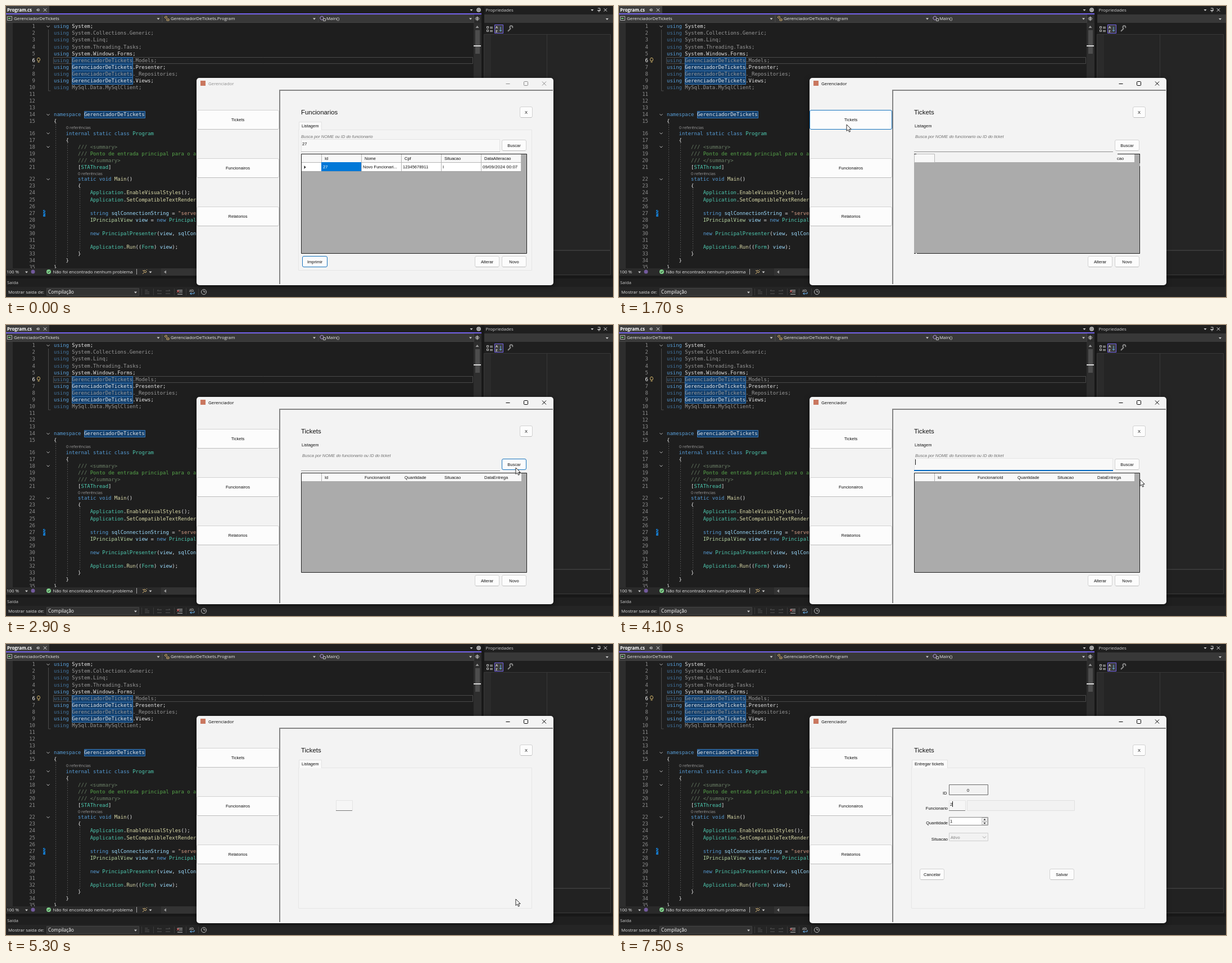
These frames come from a looping animation (1080x518 px, 8000 ms). An HTML page with a canvas:

```html
<!DOCTYPE html>
<html lang="pt">
<head>
<meta charset="utf-8">
<title>Gerenciador</title>
<style>
html, body { margin: 0; width: 100%; height: 100%; overflow: hidden; background: #1f1f1f; }
canvas { display: block; }
</style>
</head>
<body>
<canvas id="stage" width="1080" height="518"></canvas>
<script>
const g = document.getElementById('stage').getContext('2d');
const MONO = '8.96px "DejaVu Sans Mono", monospace', CHAR = 5.393;
const UI = '7.9px "Open Sans", sans-serif', UI_BOLD = 'bold ' + UI;
const FORM = '7.5px "Liberation Sans", Arial, sans-serif';
const BLUE = '#0067c0', FACE = '#f3f3f3';

// Drawing helpers
function rect(x, y, w, h, color) { g.fillStyle = color; g.fillRect(x, y, w, h); }
function box(x, y, w, h, stroke, fill, r = 0) {
  g.beginPath();
  g.roundRect(x + .5, y + .5, w - 1, h - 1, r);
  if (fill) { g.fillStyle = fill; g.fill(); }
  g.strokeStyle = stroke; g.lineWidth = 1; g.stroke();
}
function text(s, x, y, color, font = UI, align = 'left') {
  g.font = font; g.fillStyle = color; g.textAlign = align;
  g.fillText(s, x, y + parseFloat(font.replace(/^\D+/, '')) * .35);
}
function path(d, x, y, stroke, fill, width = 1) {
  const p = new Path2D(d);
  g.save(); g.translate(x, y);
  if (fill) { g.fillStyle = fill; g.fill(p); }
  if (stroke) { g.strokeStyle = stroke; g.lineWidth = width; g.stroke(p); }
  g.restore();
}
const drop = (x, y, c = '#d0d0d0') => path('M-2.5-1h5L0 2z', x, y, null, c);
const cross = (x, y, r, c) => path(`M${-r} ${-r}L${r} ${r}M${r} ${-r}L${-r} ${r}`, x, y, c);

// Code: "~" starts a run, its first letter is the colour
const INK = {
  k: '#569cd6', K: '#41719a', w: '#e4e4e4', D: '#989898', t: '#4ec9b0', i: '#b8d7a3',
  m: '#dcdcaa', s: '#d69d85', c: '#57a64a', d: '#6a7f66', v: '#9cdcfe'
};
const CODE = [
  '~kusing~w System;', '~Kusing~D System.Collections.Generic;', '~Kusing~D System.Linq;',
  '~Kusing~D System.Threading.Tasks;', '~kusing~w System.Windows.Forms;',
  '~Kusing~D GerenciadorDeTickets.Models;', '~kusing~w GerenciadorDeTickets.Presenter;',
  '~Kusing~D GerenciadorDeTickets._Repositories;', '~kusing~w GerenciadorDeTickets.Views;',
  '~Kusing~D MySql.Data.MySqlClient;', '', '', '',
  '~knamespace~w GerenciadorDeTickets', '~w{',
  '~k    internal static class ~tProgram', '~w    {',
  '~d        /// <summary>', '~d        ///~c Ponto de entrada principal para o aplicativo.',
  '~d        /// </summary>', '~w        [~tSTAThread~w]',
  '~k        static void ~mMain~w()', '~w        {',
  '~t            Application~w.~mEnableVisualStyles~w();',
  '~t            Application~w.~mSetCompatibleTextRenderingDefault~w(~kfalse~w);', '',
  '~k            string ~vsqlConnectionString~w = ~s"server=local"~w;',
  '~i            IPrincipalView ~vview~w = ~knew ~tPrincipalView~w();', '',
  '~k            new ~tPrincipalPresenter~w(~vview~w, ~vsqlConnectionString~w);', '',
  '~t            Application~w.~mRun~w((~tForm~w) ~vview~w);',
  '~w        }', '~w    }', '~w}'
];
const lineY = n => 36.2 + (n - 1) * 12.08 + (n > 15 ? 9 : 0) + (n > 21 ? 9.3 : 0);

function guide(x, y1, y2) {
  g.setLineDash([2, 2]);
  path(`M0 ${y1}V${y2}`, x + .5, 0, '#505050');
  g.setLineDash([]);
}

function editor() {
  rect(0, 0, 1080, 518, '#1f1f1f');
  rect(0, 30, 832, 437, '#1e1e1e');
  rect(0, 30, 12, 437, '#2d2d2d');
  box(84, 91, 747, 12, '#4a4a4a');
  path('M0 42V151h4', 75.5, 0, '#4a4a4a');
  guide(88, 211, 460); guide(109, 244, 448); guide(131, 326, 436);
  for (const n of [6, 7, 8, 9, 14])
    box(n == 14 ? 139 : 117, Math.round(lineY(n)) - 6, 109, 13, '#3a78b5', '#123f6d');
  CODE.forEach((line, i) => {
    const n = i + 1, y = lineY(n);
    let x = 85;
    text(n, 52, y, n == 6 ? '#fff' : '#8c8c8c', MONO, 'right');
    for (const run of line.split('~').slice(1)) {
      text(run.slice(1), x, y, INK[run[0]], MONO);
      x += (run.length - 1) * CHAR;
    }
  });
  const lens = '7.3px "Open Sans", sans-serif';
  text('0 referências', 107, 216.5, '#9a9a9a', lens);
  text('0 referências', 128, 298, '#9a9a9a', lens);
  for (const n of [1, 14, 16, 18, 22]) path('M-2.5-1L0 1.5 2.5-1', 75, lineY(n), '#c0c0c0');
  rect(66, 363, 4, 12, '#1576c4'); path('M0 5l4-4M0 9l4-4', 66, 362, '#1e1e1e');
  path('M-1.5 2.5C-6-5 6-5 1.5 2.5zM-1.5 4.5h3', 58, 95.5, '#e0c070');

  // Scroll bar
  rect(832, 30, 14, 437, '#2e2e2e');
  rect(835, 43, 8, 42, '#4d4d4d');
  path('M-3 2h6L0-2z', 838.5, 37, null, '#999');
  rect(832, 70, 13, 2, '#d8d8d8');

  // Tab and navigation bar
  rect(0, 0, 77, 14, '#3d3d3d');
  rect(0, 13, 846, 2, '#7160e8');
  text('Program.cs', 2, 7, '#fff', UI_BOLD);
  path('M-3 0h2M-1-2v4M-1-1.500h3v3h-3', 57, 7, '#d0d0d0');
  cross(69.5, 7, 2.7, '#e0e0e0');
  drop(828, 7);
  path('M3 0A3 3 0 1 1-3 0A3 3 0 1 1 3 0M1 0A1 1 0 1 1-1 0A1 1 0 1 1 1 0', 841, 7, '#c8c8c8', null, 1.5);
  rect(0, 15, 846, 15, '#2b2b2b');
  for (const x of [0, 278, 555]) box(x, 15, 278, 15, '#424242', '#383838');
  box(2, 18, 9, 8, '#b0b0b0'); rect(4, 21, 4, 2, '#6fbf73');
  text('GerenciadorDeTickets', 14, 22.5, '#eee');
  path('M-4-2l3-2 2 2-3 2zM0 1h4v3h-4z', 286, 22, '#d8b26a');
  text('GerenciadorDeTickets.Program', 293, 22.5, '#eee');
  path('M-4-2l3-2 3 2v3l-3 2-3-2z', 563, 22, '#b69be0');
  box(564, 22, 5, 5, '#c0c0c0');
  text('Main()', 570, 22.5, '#eee');
  for (const x of [271, 548.5, 826.5]) drop(x, 22.5);
  path('M-4 0h8M0-4v8M-3-2h6M-3 2h6', 838.5, 22.5, '#c0c0c0');

  properties();
  footer();
}

function properties() {
  rect(846, 0, 5, 480, '#181818');
  rect(851, 0, 229, 480, '#1f1f1f');
  text('Propriedades', 853.5, 7.5, '#d0d0d0');
  drop(1043, 7);
  path('M-2-3h4v4h-4M-3 1h6M0 1v3', 1055, 7, '#d0d0d0');
  cross(1066.5, 7, 2.7, '#e0e0e0');
  rect(851, 15, 229, 15, '#383838');
  drop(1069.5, 23);
  for (const y of [36, 42]) {
    box(855, y, 4, 4, '#c0c0c0');
    rect(861, y + 1, 5, 1, '#c0c0c0'); rect(861, y + 3, 5, 1, '#c0c0c0');
  }
  box(869, 33, 16, 16, '#7160e8', '#3d3d3d');
  text('A', 871, 38, '#ddd', 'bold 6px "Open Sans", sans-serif');
  text('Z', 871, 45, '#ddd', 'bold 6px "Open Sans", sans-serif');
  path('M0-4v8M-2 2l2 2 2-2', 880, 41, '#6cb2ec');
  path('M-4 4l5-5M1-1a2.500 2.500 0 1 1 3-1', 897, 41, '#8a8a8a', null, 2);
  box(850, 50, 226, 385, '#383838', '#252525');
  rect(851, 51, 12, 383, '#2b2b2b');
  rect(962, 51, 1, 383, '#383838');
  box(850, 435, 226, 44, '#383838', '#222');
}

function footer() {
  rect(0, 467, 846, 13, '#2a2a2a');
  text('100 %', 1, 473.5, '#e0e0e0');
  drop(36.5, 473.5);
  g.beginPath(); g.arc(48, 473, 3.5, 0, 7); g.fillStyle = '#725a9c'; g.fill();
  g.beginPath(); g.arc(76, 473, 4, 0, 7); g.fillStyle = '#7fd08a'; g.fill();
  path('M-2 0l1.500 1.500L2-1.500', 76, 473, '#1e1e1e');
  text('Não foi encontrado nenhum problema', 83.5, 473.5, '#e4e4e4');
  rect(232, 468, 1, 10, '#aaa');
  path('M-4 4l4-4M0-3l3 3-2 2-3-3zM-3-3v2M3-4l1 1', 247, 473, '#d9b878');
  drop(257, 473.5);
  rect(276, 467, 570, 13, '#333');
  path('M2-3v6L-2 0z', 283, 473.5, null, '#999');
  rect(0, 480, 1080, 5, '#181818');
  rect(0, 485, 1080, 33, '#1f1f1f');
  text('Saída', 2, 492.5, '#c8c8c8');
  rect(0, 500, 1080, 18, '#252525');
  text('Mostrar saída de:', 4, 509.5, '#e0e0e0');
  box(72, 502, 165, 14, '#434343', '#333');
  text('Compilação', 75, 509.5, '#fff', '8.4px "Open Sans", sans-serif');
  drop(230.5, 509.5);
  const dim = '#555';
  for (const x of [241, 262, 299, 320, 342]) rect(x, 503, 1, 12, '#3a3a3a');
  path('M-4-3h5M-4 0h8M-4 3h8', 251, 509, dim);
  path('M4-2h-8l2-2M-4 3h8', 273, 509, dim);
  path('M-4-2h8l-2-2M-4 3h8', 288, 509, dim);
  path('M-4-3h9M-1 0h6M-4 4h9', 309, 509, '#d0d0d0');
  cross(306, 508, 2, '#e05a5a');
  path('M-4 3h8v-3M-1 1l-2 2 2 2', 331, 509, '#6cb2ec');
  text('ab', 326, 507, '#d0d0d0', '7px "Open Sans", sans-serif');
  path('M4.500 0A4.500 4.500 0 1 1-4.500 0A4.500 4.500 0 1 1 4.500 0M0-3v3h3', 352, 509, '#c0c0c0');
}

// Window parts
const label = (s, x, y, align, color = '#111') => text(s, x, y, color, FORM, align);
function button(s, x, y, w, h, hot) {
  box(x, y, w, h, hot ? '#1673bd' : '#d2d2d2', '#fcfcfc', 2.5);
  if (!hot) rect(x + 2, y + h - 1, w - 4, 1, '#bdbdbd');
  label(s, x + w / 2, y + h / 2, 'center');
}
function tab(s, w) {
  box(520, 220, 416, 251, '#e6e6e6', '#f4f4f4');
  box(521, 206, w, 15, '#e2e2e2', '#fafafa');
  rect(522, 220, w - 2, 1, '#fafafa');
  label(s, 526, 213.5);
}
const HEADS = {
  staff: ['Id', 'Nome', 'Cpf', 'Situacao', 'DataAlteracao'],
  list: ['Id', 'FuncionarioId', 'Quantidade', 'Situacao', 'DataEntrega']
};
const colX = i => 561 + i * 71;

function grid(heads) {
  box(525, 263, 402, 178, '#222', '#ababab');
  rect(526, 264, 391, 14, '#f8f8f8');
  rect(561, 264, 1, 14, '#b0b0b0');
  heads.forEach((s, i) => label(s, colX(i) + 6, 271));
}

function staffPage() {
  tab('Listagem', 41);
  label('Busca por NOME ou ID do funcionario', 525, 232, 'left', '#777');
  italic('Busca por NOME ou ID do funcionario', 525);
  box(525, 237, 354, 23, '#e4e4e4', '#f8f8f8');
  rect(525, 259, 354, 1, '#b8b8b8');
  label('27', 527, 245);
  grid(HEADS.staff);
  rect(526, 278, 391, 17, '#fff');
  for (let i = 0; i < 6; i++) rect(colX(i), 264, 1, 31, '#b4b4b4');
  rect(526, 278, 391, 1, '#b4b4b4'); rect(526, 294, 391, 1, '#a0a0a0');
  rect(561, 278, 71, 16, '#0078d7');
  path('M-1.500-3v6l3-3z', 532, 287, null, '#222');
  label('27', 564, 286.5, 'left', '#fff');
  ['Novo Funcionari...', '12345678911', 'I'].forEach((s, i) => label(s, colX(i + 1) + 3, 286.5));
  text('09/09/2024 00:07', 848, 286.5, '#111', '8px "Liberation Sans", Arial, sans-serif');
  button('Imprimir', 527, 445, 45, 20, true);
}
function italic(s, x) {
  rect(x, 227, 200, 10, x == 525 ? '#f4f4f4' : FACE);
  text(s, x, 232, '#707070', 'italic ' + FORM);
}

function listPage(t) {
  const typing = t >= 3600 && t < 4600;
  label('Listagem', 526, 213.5);
  italic('Busca por NOME do funcionario ou ID do ticket', 527);
  if (typing) {
    box(525, 237, 354, 23, '#e6e6e6', '#f8f8f8');
    rect(525, 258, 354, 2, BLUE);
    rect(527, 239, 1, 10, '#111');
  } else rect(525, 259, 354, 1, '#8e8e8e');
  if (t >= 1800) return grid(HEADS.list);
  // Half painted table
  rect(525, 278, 402, 163, '#ababab');
  box(525, 263, 37, 16, '#b8b8b8', '#f8f8f8');
  rect(887, 264, 30, 14, '#f8f8f8'); label('cao', 886, 271);
  rect(917, 263, 10, 15, '#ababab');
  rect(525, 263, 4, 1, '#222'); rect(887, 263, 40, 1, '#222');
  rect(926, 263, 1, 17, '#222'); rect(926, 285, 1, 156, '#222');
  rect(525, 440, 402, 1, '#222'); rect(528, 440, 2, 1, FACE);
}

function idBox() {
  box(587, 278, 30, 19, '#e4e4e4', '#f6f6f6');
  rect(587, 296, 29, 1, '#777');
}
function entryPage(t) {
  if (t < 5500) { tab('Listagem', 41); return idBox(); }
  tab('Entregar tickets', 64);
  label('ID', 583.5, 265, 'right');
  label('Funcionario', 585, 292.5, 'right');
  label('Quantidade', 585, 318.5, 'right');
  label('Situacao', 585, 347, 'right');
  box(587, 250, 70, 19, '#6a6a6a', '#f2f2f2');
  label('0', 621, 260.5, 'center');
  idBox();
  box(619, 278, 192, 19, '#e0e0e0', '#f2f2f2');
  box(587, 308, 70, 15, '#8a8a8a', '#fff');
  label('1', 589, 315.5);
  box(645, 309, 11, 7, '#c8c8c8', '#f0f0f0'); box(645, 316, 11, 6, '#c8c8c8', '#f0f0f0');
  path('M-2 1h4L0-1.500z', 650.5, 312.5, null, '#222');
  path('M-2-1h4L0 1.500z', 650.5, 319, null, '#222');
  box(587, 336, 70, 15, '#cfcfcf', '#f2f2f2');
  label('Ativo', 590, 344, 'left', '#848484');
  path('M-3-1.500L0 1.500 3-1.500', 650, 344, '#a0a0a0');
  button('Cancelar', 535, 400, 44, 20);
  button('Salvar', 766, 400, 44, 20);
  if (t >= 7500) label('2', 589, 285.5);
  if (t >= 6500 && t < 7000) rect(589, 280, 1, 10, '#111');
  if (t >= 7500) rect(593, 280, 1, 10, '#111');
}

function win(t) {
  g.save();
  g.shadowColor = 'rgba(0,0,0,.5)'; g.shadowBlur = 8; g.shadowOffsetY = 2;
  g.beginPath(); g.roundRect(339, 128, 635, 369, 5);
  g.fillStyle = FACE; g.fill();
  g.restore();
  const shade = Math.round(140 - 46 * Math.max(0, Math.min(3, t / 100)));
  const ink = `rgb(${shade},${shade},${shade})`;
  rect(346, 133, 9, 9, '#c9775f');
  text('Gerenciador', 360, 138.5, ink);
  path('M-3.500 0h7', 893, 138.5, ink);
  box(921, 134, 8, 8, ink, null, 1);
  cross(957.5, 138, 3.5, ink);
  rect(487, 149, 486, 2, '#858585'); rect(486, 149, 2, 346, '#858585');
  button('Tickets', 339, 185, 147, 35, t >= 1200 && t < 2300);
  button('Funcionairos', 339, 271, 147, 35);
  button('Relatorios', 339, 357, 147, 35);

  const staff = t < 1700, entry = t >= 5300;
  text(staff ? 'Funcionarios' : 'Tickets', 525, 189, '#111', '11.4px "Liberation Sans", Arial, sans-serif');
  button('X', 914, 179, 23, 20);
  if (entry) return entryPage(t);
  if (staff) staffPage(); else listPage(t);
  button('Buscar', 882, 238, 44, 20, t >= 2800 && t < 3600 || t >= 4500);
  button('Alterar', 834, 445, 44, 20);
  button('Novo', 882, 445, 44, 20, t >= 5100);
}

// Pointer: time, x, y
const TRAIL = [
  [500, 860, 2], [1200, 405, 212], [1300, 405, 212], [1400, 405, 211], [2100, 405, 211],
  [2900, 907, 254], [3000, 907, 254], [3400, 800, 246], [3500, 800, 246], [4100, 927, 275],
  [4200, 927, 275], [4500, 908, 252], [4600, 908, 252], [5100, 907, 454], [5400, 907, 454],
  [6100, 600, 288], [6300, 600, 288]
];
function pointer(t) {
  const i = TRAIL.findIndex(p => p[0] > t);
  if (i < 1) return;
  const [a, b] = [TRAIL[i - 1], TRAIL[i]];
  let k = (t - a[0]) / (b[0] - a[0]);
  k = k * k * (3 - 2 * k);
  const x = a[1] + (b[1] - a[1]) * k, y = a[2] + (b[2] - a[2]) * k;
  const inside = (l, top, r, bot) => x > l && x < r && y > top && y < bot;
  const beam = t < 5300 ? t > 1800 && inside(525, 237, 879, 260) : inside(587, 278, 616, 297);
  if (beam) path('M-2-5h4M0-5v10M-2 5h4', x, y, '#222');
  else path('M0 0V11.500L2.700 9l1.900 4.200 1.900-.9L4.700 8.300H8.200z', x, y, '#111', '#fff', .9);
}

let last = -1;
function frame(now) {
  const t = Math.floor(now % 8000 / 100) * 100;
  if (t !== last) {
    last = t;
    editor();
    win(t);
    pointer(t);
  }
  requestAnimationFrame(frame);
}
const start = performance.now();
requestAnimationFrame(function tick() {
  frame(Math.max(0, performance.now() - start));
});
</script>
</body>
</html>
```
